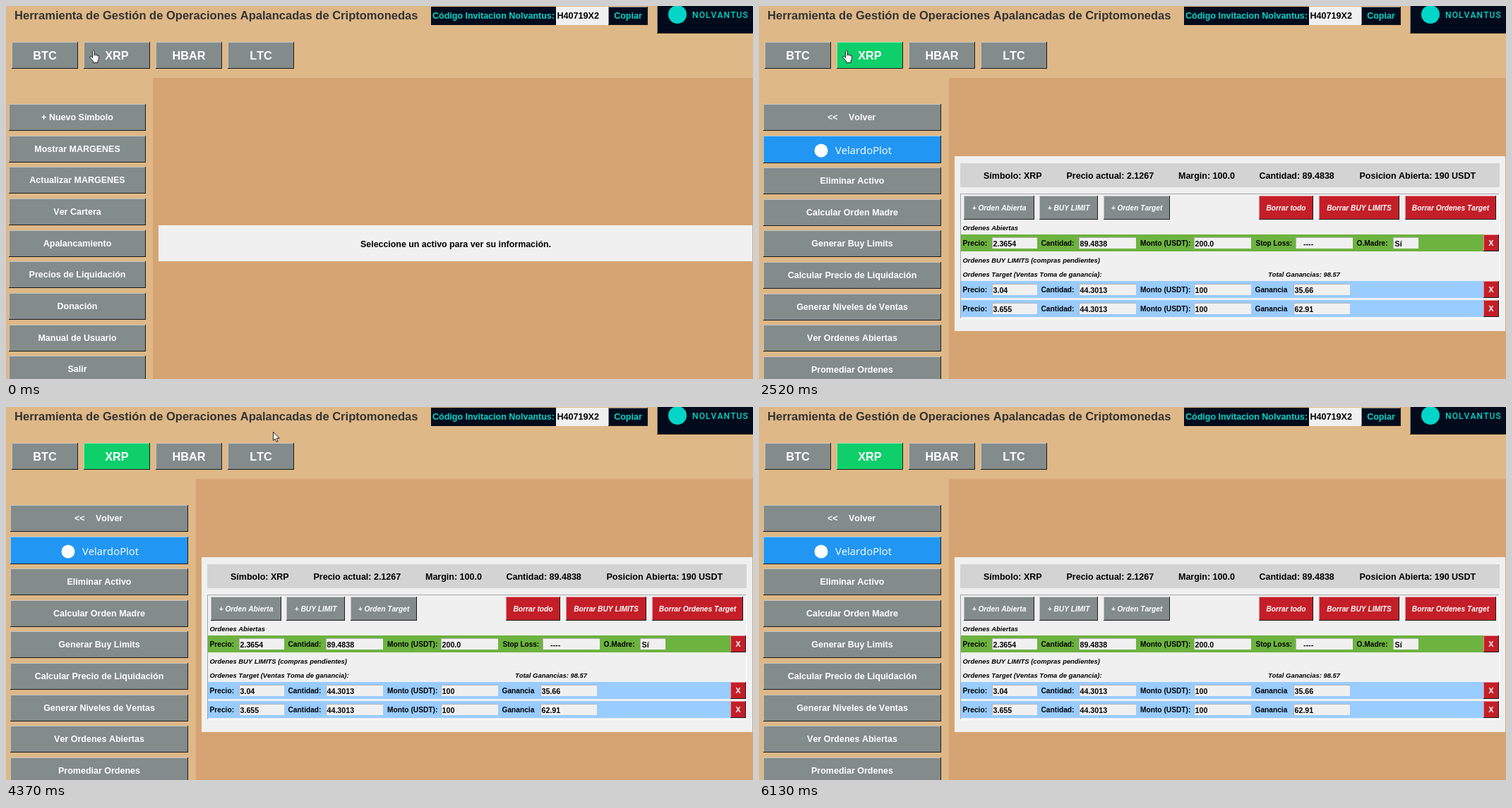
These frames come from a looping animation (1058x529 px, 6.96 s). An HTML page:

```html
<!DOCTYPE html>
<html lang="es">
<head>
<meta charset="utf-8">
<title>Gestión de operaciones</title>
<style>
html, body { margin: 0; width: 100%; height: 100%; overflow: hidden; background: #deb887; }
svg { display: block; width: 1058px; height: 529px; }
text { font-family: "Liberation Sans", Arial, sans-serif; font-weight: bold; font-kerning: none; white-space: pre; }
</style>
</head>
<body>
<svg id="stage" viewBox="0 0 1058 529"></svg>
<script>
const NS = "http://www.w3.org/2000/svg";
const LOOP = 6960;
const GREY = "#838b8b", RED = "#c41e28", NAVY = "#010b1c", CYAN = "#00d5c8";
const PALE = "#f0f0f0", TAN = "#d6a472", SAND = "#deb887";
const stage = document.getElementById("stage");

function add(parent, tag, attrs) {
  const el = document.createElementNS(NS, tag);
  for (const key in attrs) el.setAttribute(key, attrs[key]);
  return parent.appendChild(el);
}
const group = () => add(stage, "g", {});
const box = (g, x, y, r, b, fill) =>
  add(g, "rect", { x, y, width: r - x, height: b - y, fill });

function label(g, str, x, y, size = 12.5, fill = "#000", extra = {}) {
  add(g, "text", { x, y, "font-size": size, fill, ...extra }).textContent = str;
}
const MID = { "text-anchor": "middle" };
const ITALIC = { "font-style": "italic" };

// Mixes a hex colour half way to white
const lighten = hex => "#" + hex.match(/\w\w/g)
  .map(c => Math.round((parseInt(c, 16) + 255) / 2).toString(16).padStart(2, "0")).join("");

// Raised box: light edge at top left, dark edge at bottom right
function raised(g, x, y, r, b, fill) {
  box(g, x, y, r, b, "#191b1b");
  box(g, x, y, r - 1, b - 1, lighten(fill));
  box(g, x + 1, y + 1, r - 1, b - 1, fill);
}
function button(g, str, x, y, r, b, size = 12.5, fill = GREY, extra = {}) {
  raised(g, x, y, r, b, fill);
  label(g, str, (x + r) / 2, (y + b) / 2 + size * 0.345, size, "#fff", { ...MID, ...extra });
}
function entry(g, str, x, y, r, pad = 0.5) {
  box(g, x - 1, y - 1, r, y + 15, "#b4b4b4");
  box(g, x, y, r, y + 15, PALE);
  label(g, str, x + pad, y + 11.5, 10.7);
}

function drawHeader() {
  const g = group();
  box(g, 0, 0, 1058, 529, SAND);
  label(g, "Herramienta de Gestión de Operaciones Apalancadas de Criptomonedas", 12, 19, 16.55, "#333");
  box(g, 602, 1, 779, 27, NAVY);
  label(g, "Código Invitacion Nolvantus:", 604, 18, 12.5, CYAN);
  box(g, 779, 1, 853, 27, PALE);
  label(g, "H40719X2", 780.5, 18, 12.6);
  raised(g, 853, 1, 909, 27, NAVY);
  label(g, "Copiar", 881, 18, 12.5, CYAN, MID);
  raised(g, 922, -2, 1060, 39, NAVY);
  add(g, "circle", { cx: 951, cy: 12, r: 13, fill: CYAN });
  label(g, "NOLVANTUS", 972, 17, 12, CYAN,
    { style: "font-family:Roboto,sans-serif;font-weight:500;letter-spacing:1.1px" });
  ["BTC", "XRP", "HBAR", "LTC"].forEach((name, i) =>
    button(g, name, 8 + 102 * i, 51, 102 + 102 * i, 89, 16.3));
}

function drawHome() {
  const g = group();
  box(g, 208, 102, 1058, 529, TAN);
  ["+ Nuevo Símbolo", "Mostrar MARGENES", "Actualizar MARGENES", "Ver Cartera", "Apalancamiento",
    "Precios de Liquidación", "Donación", "Manual de Usuario", "Salir"].forEach((name, i) => {
    const y = Math.round(139 + 44.65 * i);
    button(g, name, 4, y, 198, y + 38);
  });
  box(g, 216, 311, 1057, 362, PALE);
  label(g, "Seleccione un activo para ver su información.", 637, 341.5, 12.4, "#000", MID);
  return g;
}

function drawPressedTab() {
  const g = group();
  box(g, 110, 51, 204, 89, "#fff");
  box(g, 110, 51, 203, 88, "#d8d4ce");
  box(g, 111, 52, 203, 88, PALE);
  label(g, "XRP", 157, 76, 16.3, "#000", MID);
  return g;
}

function drawAsset() {
  const g = group();
  button(g, "XRP", 110, 51, 204, 89, 16.3, "#0ecf6a");
  box(g, 269, 102, 1058, 529, TAN);
  ["", "", "Eliminar Activo", "Calcular Orden Madre", "Generar Buy Limits",
    "Calcular Precio de Liquidación", "Generar Niveles de Ventas", "Ver Ordenes Abiertas",
    "Promediar Ordenes"].forEach((name, i) => {
    const y = Math.round(139.7 + 44.65 * i - (i < 2 ? 0.7 : 0));
    button(g, name, 6, y, 258, y + (i === 1 ? 39 : 38), 12.5, i === 1 ? "#2196f3" : GREY);
  });
  label(g, "<<", 97, 162, 12.5, "#fff");
  label(g, "Volver", 127, 162, 12.5, "#fff");
  add(g, "circle", { cx: 88, cy: 205, r: 9.5, fill: "#fff" });
  label(g, "VelardoPlot", 108, 210, 14.8, "#fff",
    { style: "font-family:'Open Sans',sans-serif;font-weight:400" });

  box(g, 277, 213, 1057, 461, PALE);
  box(g, 285, 223, 1049, 257, "#d3d3d3");
  [["Símbolo: XRP", 318], ["Precio actual: 2.1267", 435.5], ["Margin: 100.0", 594],
    ["Cantidad: 89.4838", 708.5], ["Posicion Abierta: 190 USDT", 850.5]]
    .forEach(([str, x]) => label(g, str, x, 244.5));

  box(g, 285, 266, 1049, 444, "#fff");
  box(g, 285, 266, 1048, 443, "#a6a6a6");
  box(g, 286, 267, 1048, 443, PALE);
  [["+ Orden Abierta", 290, 390], ["+ BUY LIMIT", 397, 480], ["+ Orden Target", 488, 582],
    ["Borrar todo", 708, 785], ["Borrar BUY LIMITS", 793, 907], ["Borrar Ordenes Target", 915, 1044]]
    .forEach(([str, x, r], i) => button(g, str, x, 269, r, 303, 10.2, i < 3 ? GREY : RED, ITALIC));
  return g;
}

function drawRow(g, y, fill, price, amount, total) {
  box(g, 286, y, 1048, y + 24, fill);
  [["Precio:", 288.5], ["Cantidad:", 399.5], ["Monto (USDT):", 540]]
    .forEach(([str, x]) => label(g, str, x, y + 16, 10.2));
  entry(g, price, 331, y + 5, 394);
  entry(g, amount, 454, y + 5, 534);
  entry(g, total, 617, y + 5, 697);
  button(g, "X", 1026, y, 1048, y + 24, 11, RED);
}

function drawOrders() {
  const g = group();
  const note = (str, x, y) => label(g, str, x, y, 9.42, "#000", ITALIC);
  note("Ordenes Abiertas", 288.5, 318);
  note("Ordenes BUY LIMITS (compras pendientes)", 288.5, 364);
  note("Ordenes Target (Ventas Toma de ganancia):", 288.5, 384);
  note("Total Ganancias: 98.57", 721, 384);
  drawRow(g, 324, "#6db33f", "2.3654", "89.4838", "200.0");
  label(g, "Stop Loss:", 703.5, 340, 10);
  entry(g, "----", 761, 329, 841, 10);
  label(g, "O.Madre:", 846.5, 340, 10.2);
  entry(g, "Sí", 899, 329, 934, 1.5);
  [["3.04", "35.66"], ["3.655", "62.91"]].forEach(([price, gain], i) => {
    const y = 390 + 27 * i;
    drawRow(g, y, "#99ccff", price, "44.3013", "100");
    label(g, "Ganancia", 702.5, y + 16, 10.2);
    entry(g, gain, 758, y + 5, 837);
  });
  return g;
}

// Header corner not yet painted while the orders load
function drawGap() {
  const g = group();
  box(g, 1018, 223, 1049, 247, TAN);
  box(g, 1018, 247, 1049, 249, PALE);
  return g;
}

function drawPointer(d) {
  const g = group();
  add(g, "path", { d, fill: "#fff", stroke: "#111", "stroke-width": 0.9, "stroke-linejoin": "round" });
  return g;
}

drawHeader();
const home = drawHome(), pressed = drawPressedTab(), asset = drawAsset();
const orders = drawOrders(), gap = drawGap();
const hand = drawPointer("M4.5 1.8Q5.7 -.4 7 1.8V6.6Q8.4 5.6 9.4 7Q10.8 6.4 11.6 7.8Q13.4 7.4 13.5 9.4" +
  "V13L12 16V18.5H5.5V16.2L.8 11Q.6 8.8 2.6 9.4L4.5 11.3ZM7 6.6V9M9.4 7V9M11.6 7.8V9.5");
const arrow = drawPointer("M.5 .5V12.5L3.2 10L5.1 14.5L7 13.7L5.2 9.3H9.2Z");

// Pointer stops: time, x, y; the pointer jumps between them
const stops = [
  [0, 118, 62], [3680, 123, 61], [3830, 139, 60], [3980, 178, 57], [4100, 224, 53],
  [4250, 296, 44], [4370, 378, 35], [4490, 453, 28], [4640, 560, 20], [4760, 690, 16],
  [4880, 818, 26], [5000, 913, 35], [5150, 953, 83], [5300, 963, 205], [5450, 953, 318],
  [5580, 966, 421], [5730, 986, 456], [5860, 1011, 493], [5980, 1034, 527], [6130, 1034, 540]
];
const HAND_UNTIL = 4250;

const show = (el, on) => el.setAttribute("display", on ? "inline" : "none");

function render(t) {
  show(home, t < 2400);
  show(pressed, t >= 840 && t < 2400);
  show(asset, t >= 2400);
  show(gap, t >= 2400 && t < 2520);
  show(orders, t >= 2520);
  const [, x, y] = stops.filter(stop => stop[0] <= t).pop();
  show(hand, t < HAND_UNTIL);
  show(arrow, t >= HAND_UNTIL);
  for (const el of [hand, arrow]) el.setAttribute("transform", `translate(${x} ${y})`);
}

const start = performance.now();
function tick() {
  render((performance.now() - start) % LOOP);
  requestAnimationFrame(tick);
}
tick();
</script>
</body>
</html>
```
